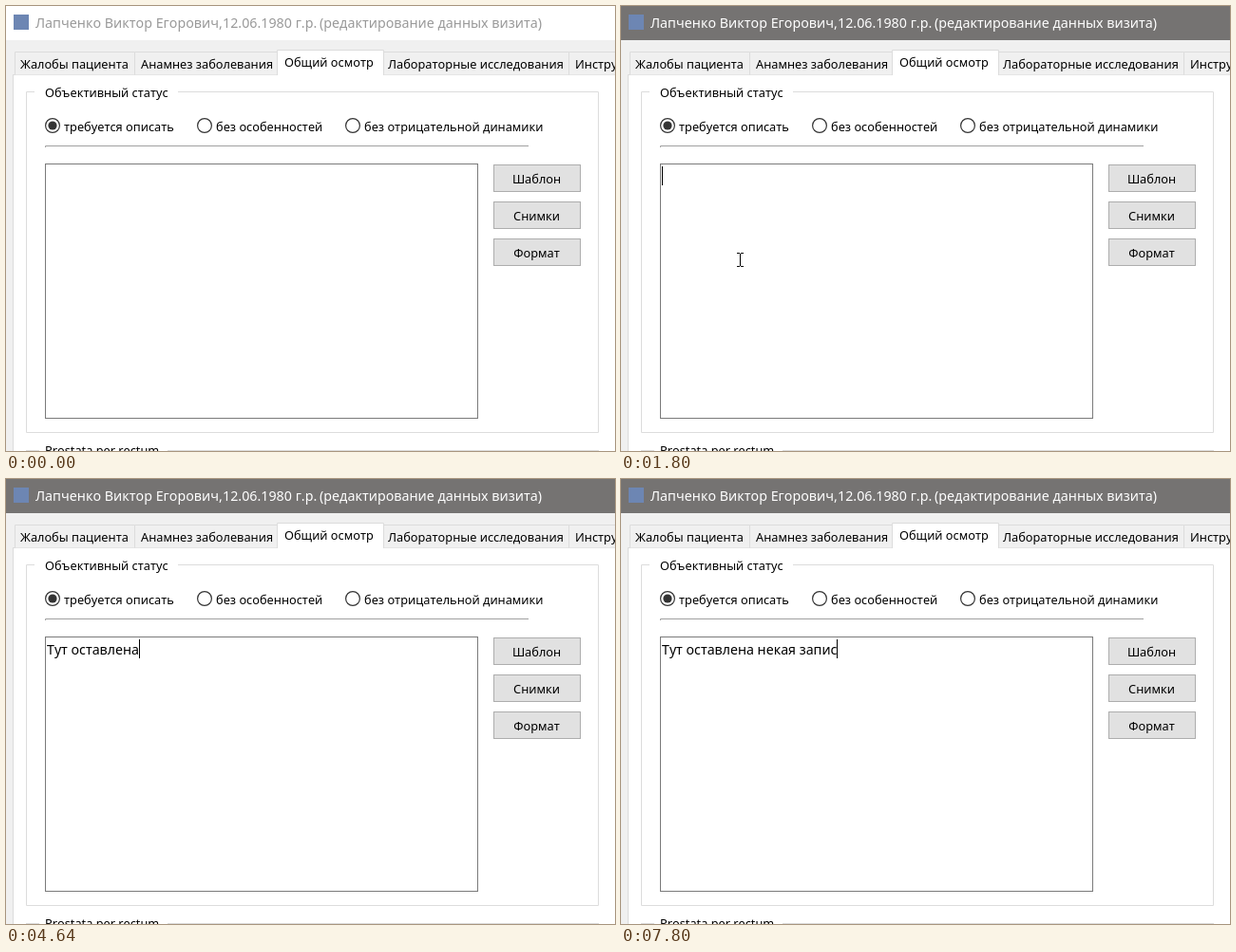
An HTML page for the animation above (8000 ms loop, 641 by 469 pixels).

```html
<!DOCTYPE html>
<html lang="ru">
<head>
<meta charset="utf-8">
<title>Данные визита</title>
<style>
  html, body { margin: 0; width: 641px; height: 469px; overflow: hidden; background: #fff; }
  svg { display: block; }
  text { font: 12.75px "Noto Sans", "Open Sans", sans-serif; font-kerning: none; white-space: pre; }
  #title text { font-size: 14.28px; }
  #typed { font-size: 14.18px; }
  .mid { text-anchor: middle; }
  .frame { fill: none; stroke: #dcdcdc; }
</style>
</head>
<body>
<svg width="641" height="469" viewBox="0 0 641 469">
  <rect id="bar" width="641" height="36"/>
  <rect x="8" y="9" width="16" height="16" fill="#6d86b3"/>
  <g id="title">
    <text x="31" y="23">Лапченко Виктор Егорович,</text>
    <text x="228" y="23">12.06.1980 г.р.</text>
    <text x="330" y="23">(редактирование данных визита)</text>
  </g>

  <rect y="36" width="641" height="433" fill="#f0f0f0"/>
  <rect x="7.5" y="72.5" width="700" height="500" fill="#fff" stroke="#dcdcdc"/>
  <g id="tabs"></g>

  <path class="frame" d="M30 90.5H21.5V449.5H623.5V90.5H181M21 468.5H35M170 468.5H624"/>
  <text x="41" y="95.5">Объективный статус</text>
  <text x="41" y="473">Prostata per rectum</text>
  <g id="radios"></g>
  <path d="M550 147.5H41.5V149" fill="none" stroke="#a0a0a0"/>
  <rect x="41.5" y="166.5" width="455" height="268" fill="#fff" stroke="#7a7a7a"/>
  <g id="buttons"></g>

  <text id="typed" x="43" y="185"></text>
  <rect id="caret" y="169" width="1" height="20"/>
  <path id="pointer" d="M-3 -6.5H0M1 -6.5H4M.5 -6V7M-3 7.5H0M1 7.5H4" stroke="#000" fill="none"/>
  <circle id="click" cx="122" cy="265.5" r="14.7" fill="#ff0" opacity=".5"/>
</svg>
<script>
const $ = id => document.getElementById(id);
const show = (id, on) => $(id).setAttribute('visibility', on ? 'visible' : 'hidden');

// Static rows: tabs, radio buttons, push buttons
const tab = (left, right, textX, label, active) => {
  const top = active ? 46.5 : 48.5, bottom = active ? 73 : 72.5;
  return `<path d="M${left}.5 ${bottom}V${top}H${right}.5V${bottom}" fill="${active ? '#fff' : '#f0f0f0'}" stroke="#dcdcdc"/>
    <text x="${textX}" y="${active ? 64 : 66}">${label}</text>`;
};
$('tabs').innerHTML =
  tab(9, 135, 15, 'Жалобы пациента') +
  tab(135, 286, 142, 'Анамнез заболевания') +
  tab(397, 592, 402, 'Лабораторные исследования') +
  tab(592, 760, 599, 'Инструментальные') +
  tab(285, 397, 293, 'Общий осмотр', true);

$('radios').innerHTML = [
  [49, 'требуется описать'],
  [209, 'без особенностей'],
  [365, 'без отрицательной динамики']
].map(([x, label], i) =>
  `<circle cx="${x}" cy="126" r="7.4" fill="#fff" stroke="#333" stroke-width="1.2"/>
   ${i ? '' : `<circle cx="${x}" cy="126" r="4.6" fill="#333"/>`}
   <text x="${x + 12}" y="132">${label}</text>`).join('');

$('buttons').innerHTML = ['Шаблон', 'Снимки', 'Формат'].map((label, i) =>
  `<rect x="513.5" y="${167.5 + i * 39}" width="91" height="28" fill="#e1e1e1" stroke="#adadad"/>
   <text class="mid" x="558.5" y="${187 + i * 39}">${label}</text>`).join('');

const LOOP = 8000;
const phrase = 'Тут оставлена некая запис';
const keyTimes = [
  2800, 3080, 3160, 3280, 3560, 3640, 3880, 4000, 4160, 4240, 4440, 4560, 4640,
  5360, 5880, 6000, 6240, 6280, 6520, 6640, 6960, 7000, 7160, 7600, 7800
];
const caretOn = [[720, 1200], [1800, 2280], [2800, 5160], [5360, LOOP]];
const pointerPath = [[360, 261, 397], [440, 165, 310], [480, 124, 266], [1080, 125, 267]];
const within = (t, from, to) => t >= from && t < to;

function draw(t) {
  const active = t >= 720;
  $('bar').setAttribute('fill', active ? '#757372' : '#fff');
  $('title').setAttribute('fill', active ? '#fff' : '#999');

  const typed = $('typed');
  typed.textContent = phrase.slice(0, keyTimes.filter(k => k <= t).length);
  const width = typed.textContent ? typed.getComputedTextLength() : 0;
  $('caret').setAttribute('x', 43 + Math.round(width));
  show('caret', caretOn.some(span => within(t, ...span)));

  const step = pointerPath.filter(p => p[0] <= t).pop();
  show('pointer', step && t < 2800);
  if (step) $('pointer').setAttribute('transform', `translate(${step[1]} ${step[2]})`);
  show('click', within(t, 720, 840));
}

function tick() {
  draw(performance.now() % LOOP);
  requestAnimationFrame(tick);
}
tick();
</script>
</body>
</html>
```
